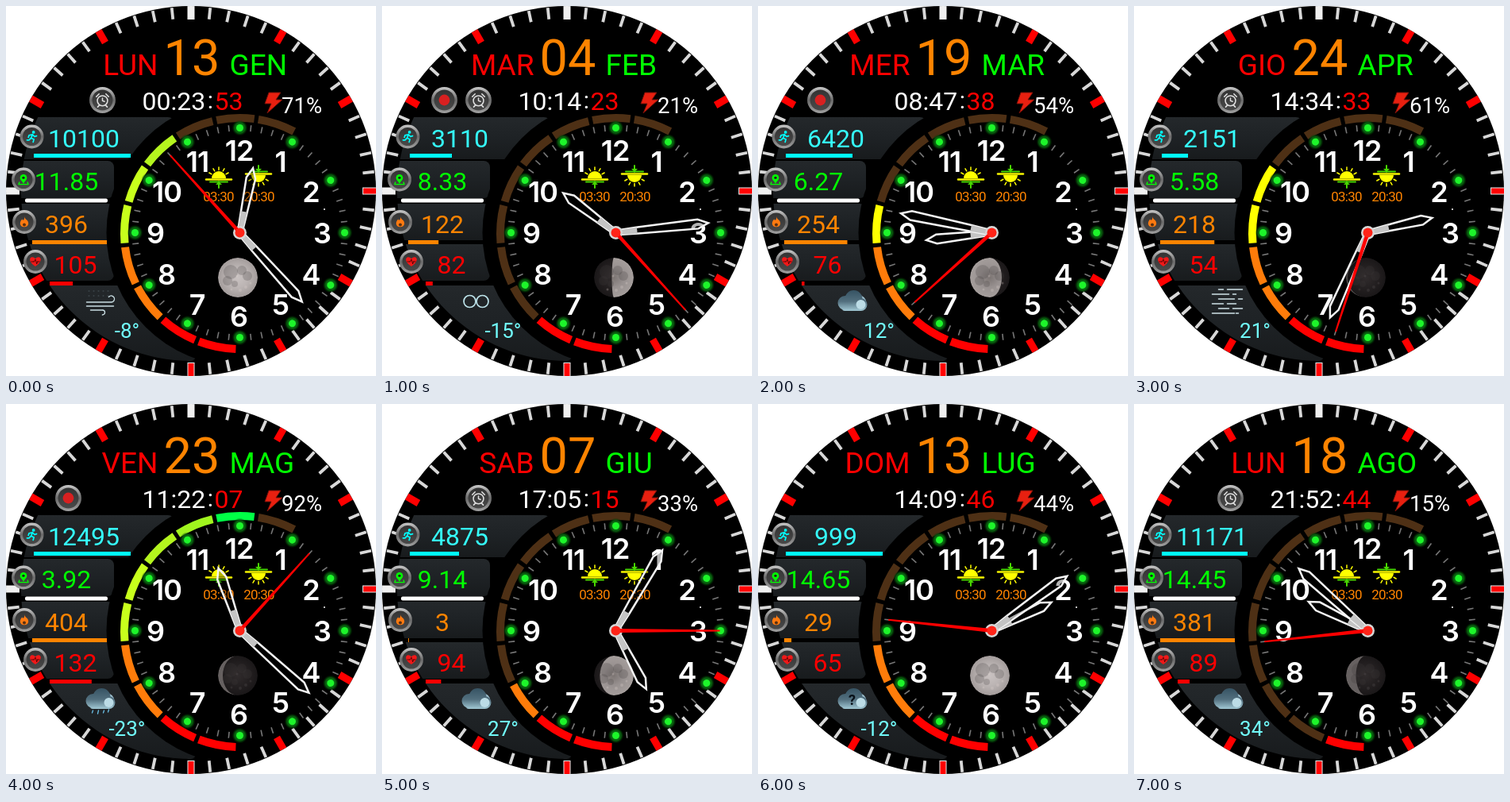
Recreate the animation shown at these times as an HTML page with a canvas. Size 466 px wide and 466 px high, loop 8000 ms.

```html
<!DOCTYPE html>
<html lang="it">
<head>
<meta charset="utf-8">
<title>Watch face</title>
<style>
html, body { margin: 0; width: 100%; height: 100%; overflow: hidden; background: #fff; }
canvas { display: block; width: 466px; height: 466px; }
</style>
</head>
<body>
<canvas id="stage" width="466" height="466"></canvas>
<script>
const ctx = document.getElementById('stage').getContext('2d');
const HOLD = 1000;
const CX = 294.5, CY = 285.5;
const RED = '#ff0000', ORANGE = '#ff8400', GREEN = '#00ff00', CYAN = '#00ffff';

// moon: lit share of the disc, negative when the right limb is lit
const state = (day, date, month, time, battery, steps, stepBar, km, kcal, pulse, weather, temp, moon, badges) =>
  ({ day, date, month, time, battery, steps, stepBar, km, kcal, pulse, weather, temp, moon, badges });

const states = [
  state('LUN', '13', 'GEN', '00:23:53', 71, 10100, 122, '11.85', 396, 105, 'wind', -8, 1, 'a'),
  state('MAR', '04', 'FEB', '10:14:23', 21, 3110, 53, '8.33', 122, 82, 'haze', -15, -.55, 'ab'),
  state('MER', '19', 'MAR', '08:47:38', 54, 6420, 84, '6.27', 254, 76, 'cloud', 12, .8, 'b'),
  state('GIO', '24', 'APR', '14:34:33', 61, 2151, 33, '5.58', 218, 54, 'mist', 21, .04, 'a'),
  state('VEN', '23', 'MAG', '11:22:07', 92, 12495, 122, '3.92', 404, 132, 'rain', -23, .12, 'b'),
  state('SAB', '07', 'GIU', '17:05:15', 33, 4875, 62, '9.14', 3, 94, 'cloud', 27, -.85, 'a'),
  state('DOM', '13', 'LUG', '14:09:46', 44, 999, 122, '14.65', 29, 65, 'unknown', -12, 1, ''),
  state('LUN', '18', 'AGO', '21:52:44', 15, 11171, 108, '14.45', 381, 89, 'cloud', 34, .25, 'a')
];

function text(str, x, y, size, color, align = 'left', weight = 400, spacing = 0, family = 'Roboto') {
  ctx.font = `${weight} ${size}px ${family}, sans-serif`;
  ctx.letterSpacing = spacing + 'px';
  ctx.textAlign = align;
  ctx.fillStyle = color;
  ctx.fillText(str, x, y);
}

function disc(x, y, r, fill) {
  ctx.beginPath();
  ctx.arc(x, y, r, 0, Math.PI * 2);
  ctx.fillStyle = fill;
  ctx.fill();
}

function poly(points, fill, stroke, width = 1) {
  ctx.beginPath();
  points.forEach(([x, y]) => ctx.lineTo(x, y));
  ctx.closePath();
  if (fill) { ctx.fillStyle = fill; ctx.fill(); }
  if (stroke) { ctx.strokeStyle = stroke; ctx.lineWidth = width; ctx.stroke(); }
}

function lines(segments, color, width) {
  ctx.strokeStyle = color;
  ctx.lineWidth = width;
  ctx.lineCap = 'round';
  ctx.beginPath();
  for (const [x1, y1, x2, y2] of segments) { ctx.moveTo(x1, y1); ctx.lineTo(x2, y2); }
  ctx.stroke();
  ctx.lineCap = 'butt';
}

function at(x, y, degrees, draw) {
  ctx.save();
  ctx.translate(x, y);
  ctx.rotate(degrees * Math.PI / 180);
  draw();
  ctx.restore();
}

function gradient(y0, y1, ...colors) {
  const g = ctx.createLinearGradient(0, y0, 0, y1);
  colors.forEach((c, i) => g.addColorStop(i / (colors.length - 1), c));
  return g;
}

function radial(r, ...colors) {
  const g = ctx.createRadialGradient(0, 0, 0, 0, 0, r);
  colors.forEach((c, i) => g.addColorStop(i / (colors.length - 1), c));
  return g;
}

function outerTicks() {
  for (let i = 0; i < 60; i++) at(233, 233, i * 6, () => {
    if (i % 5) {
      ctx.fillStyle = '#d8d8d8';
      ctx.fillRect(-1.9, -232, 3.8, 14.5);
      return;
    }
    const white = i === 0 || i === 45, bordered = i === 15 || i === 30;
    ctx.fillStyle = white || bordered ? '#f0f0f0' : RED;
    ctx.fillRect(-4.5, -233, 9, 17);
    if (bordered) {
      ctx.fillStyle = RED;
      ctx.fillRect(-3.5, -233, 7, 16);
    }
  });
}

function panel(x, y, w, h, r) {
  ctx.beginPath();
  ctx.roundRect(x, y, w, h, r);
  ctx.fillStyle = gradient(y, y + h, '#24282b', '#1e2225', '#181b1d');
  ctx.fill();
}

function panels() {
  ctx.save();
  ctx.beginPath();
  ctx.arc(233, 233, 214, 0, Math.PI * 2);
  ctx.clip();
  panel(0, 140, 212, 53, 8);
  panel(0, 195, 136, 47, 8);
  panel(0, 249, 136, 46, 8);
  panel(0, 300, 136, 46, 8);
  panel(0, 352, 240, 95, 8);
  disc(CX, CY, 168, '#000');
  ctx.restore();
}

function batteryArc(level) {
  const lit = Math.floor(level / 10);
  const mid = lit > 6 ? '#c8ff1c' : '#ffff00';
  const colors = [RED, RED, '#ff7c0a', '#ff7c0a', mid, mid, '#b4f51e', '#a0f51e', '#00ff46', '#00ff46'];
  ctx.lineWidth = 10;
  for (let i = 0; i < 10; i++) {
    const start = (92 + i * 20.8) * Math.PI / 180;
    ctx.strokeStyle = i < lit ? colors[i] : '#4e3015';
    ctx.beginPath();
    ctx.arc(CX, CY + 1, 145.5, start, start + 18.8 * Math.PI / 180);
    ctx.stroke();
  }
}

function dial() {
  for (let i = 0; i < 60; i++) at(CX, CY, i * 6, () => {
    if (i % 5) {
      ctx.fillStyle = '#777';
      ctx.fillRect(-.8, -136, 1.6, 8);
      return;
    }
    ctx.translate(0, -132);
    disc(0, 0, 10, radial(10, '#0b7a14', '#0b7a14', '#085a0e', 'rgba(0,50,0,0)'));
    disc(0, 0, 4.5, '#1df52a');
  });
  for (let n = 1; n <= 12; n++) {
    const a = n * Math.PI / 6;
    text(n, CX - 1 + Math.sin(a) * 105, CY + 13.5 - Math.cos(a) * 104.5, 36, '#fff', 'center', 600, n > 9 ? -1 : 0, 'Inter');
  }
  disc(401, 256, 1, '#fff');
}

function badge(x, y, r, icon) {
  ctx.save();
  ctx.translate(x, y);
  disc(0, 0, r, gradient(-r, r, '#c8c8c8', '#6a6a6a', '#a0a0a0'));
  disc(0, 0, r - 3.5, gradient(-r, r, '#303030', '#4c4c4c'));
  ctx.scale(.86, .86);
  icon();
  ctx.restore();
}

const icons = {
  run() {
    disc(2.5, -6.5, 2.2, CYAN);
    lines([[1, -3, -1, 2], [-1, 2, 3, 4], [3, 4, 2, 8], [-1, 2, -4, 5], [-4, 5, -7, 5],
      [1, -3, -4, -2], [-4, -2, -5, 1], [1, -3, 4, 0], [4, 0, 7, -1]], CYAN, 2);
  },
  pin() {
    disc(0, -2.5, 5, GREEN);
    poly([[-4.5, -1], [4.5, -1], [0, 6]], GREEN);
    disc(0, -2.5, 2, '#222');
    lines([[-6, 4, -7, 7], [-7, 7, 7, 7], [7, 7, 6, 4]], GREEN, 1.5);
  },
  flame() {
    ctx.beginPath();
    ctx.moveTo(0, -8);
    ctx.bezierCurveTo(1, -3, 6, -3, 6, 2);
    ctx.bezierCurveTo(6, 9, -6, 9, -6, 2);
    ctx.bezierCurveTo(-6, -1, -4, -3, -3, -4);
    ctx.bezierCurveTo(-2, -1, 1, -3, 0, -8);
    ctx.fillStyle = '#ff7a10';
    ctx.fill();
    disc(0, 4, 2.3, '#5a3010');
  },
  heart() {
    ctx.beginPath();
    ctx.moveTo(0, 7);
    ctx.bezierCurveTo(-15, -3, -5, -11, 0, -4);
    ctx.bezierCurveTo(5, -11, 15, -3, 0, 7);
    ctx.fillStyle = '#f01818';
    ctx.fill();
    lines([[-6, 0, -2, 0], [-2, 0, 0, -3], [0, -3, 2, 3], [2, 3, 3, 0], [3, 0, 6, 0]], '#400', 1);
  },
  alarm() {
    ctx.beginPath();
    ctx.arc(0, 1, 7.5, 0, Math.PI * 2);
    ctx.strokeStyle = '#e0e0e0';
    ctx.lineWidth = 1.8;
    ctx.stroke();
    lines([[0, -3, 0, 1], [0, 1, 3, 2], [-9, -5, -5, -9], [9, -5, 5, -9], [-5, 8, -7, 10], [5, 8, 7, 10]], '#e0e0e0', 1.8);
  },
  link() {
    disc(0, 0, 8, '#d82020');
  }
};

function bar(x, y, length, color) {
  ctx.fillStyle = color;
  ctx.fillRect(x, y, length, 5);
}

function stats(s) {
  bar(35, 186, s.stepBar, CYAN);
  bar(33, 295, Math.min(94, s.kcal * .313), ORANGE);
  bar(55, 347, Math.max(0, (s.pulse - 72) * .88), RED);
  ctx.beginPath();
  ctx.roundRect(24, 242.5, 104, 5, 2);
  ctx.fillStyle = '#fff';
  ctx.fill();
  badge(32.5, 164.5, 15, icons.run);
  badge(22, 218.5, 15, icons.pin);
  badge(23, 272, 15, icons.flame);
  badge(37, 322, 15, icons.heart);
  text(s.steps, 98, 177.5, 32, '#35ffff', 'center');
  text(s.km, 76, 232, 32, GREEN, 'center');
  text(s.kcal, 76, 286, 32, ORANGE, 'center');
  text(s.pulse, 87.5, 337, 32, RED, 'center');
}

function cloud(color) {
  ctx.fillStyle = color;
  ctx.beginPath();
  ctx.arc(-9, 1, 9, 0, 7);
  ctx.arc(2, -4, 11, 0, 7);
  ctx.arc(11, 3, 8, 0, 7);
  ctx.roundRect(-13, 2, 28, 9, 4);
  ctx.fill();
}

const weather = {
  wind() {
    for (let i = 0; i < 10; i++) disc(-14 + i % 5 * 6, -14 + Math.floor(i / 5) * 6, 1, '#394247');
    lines([[-17, 0, 14, 0], [-17, 5, 17, 5], [-12, 10, 3, 10]], '#c9dde2', 1.4);
    ctx.beginPath();
    ctx.arc(14, -4, 4, -2.6, 1.57);
    ctx.moveTo(3, 10);
    ctx.arc(3, 13, 3, -1.57, 1.8);
    ctx.stroke();
  },
  haze() {
    ctx.strokeStyle = '#bde3ea';
    ctx.lineWidth = 1.7;
    for (const x of [-8, 8]) {
      ctx.beginPath();
      ctx.arc(x, -1, 7.5, 0, Math.PI * 2);
      ctx.stroke();
    }
  },
  mist() {
    for (let i = 0; i < 6; i++) {
      const y = -16 + i * 6, left = i % 2 ? -20 : -12, split = i % 3 * 7 - 6;
      lines([[left, y, split, y], [split + 5, y, left + 30, y]], '#cfe2e8', 1.5);
    }
  },
  cloud() {
    disc(8, 1, 10, '#9fc2d0');
    cloud(gradient(-14, 12, '#385565', '#526f7e', '#a8d0dc'));
    disc(11, 3, 6, '#bcdce6');
  },
  rain() {
    weather.cloud();
    lines([[-9, 13, -10, 16], [-2, 13, -3, 17], [5, 13, 4, 16], [11, 12, 10, 15]], '#69bfe5', 1.3);
  },
  unknown() {
    weather.cloud();
    text('?', 0, 6, 18, '#081018', 'center', 700);
  }
};

function sun(x, y, flip) {
  ctx.save();
  ctx.translate(x, y);
  ctx.scale(1, flip);
  ctx.beginPath();
  ctx.arc(0, 0, 9, Math.PI, 0);
  ctx.fillStyle = '#ffff00';
  ctx.fill();
  const rays = [];
  for (let i = 1; i < 6; i++) {
    const a = Math.PI * (1 + i / 6), c = Math.cos(a), s = Math.sin(a);
    rays.push([c * 10.5, s * 10.5, c * 14, s * 14]);
  }
  lines(rays, '#ffff00', 1.5);
  lines([[-16, 1.5, 16, 1.5]], '#f4f400', 2.5);
  lines([[0, 4, 0, 12], [-11, 4.5, 11, 4.5]], '#48d800', 2);
  poly([[-4, 8], [0, 4], [4, 8]], '#48d800');
  ctx.restore();
}

function moon(phase) {
  const share = Math.abs(phase);
  ctx.save();
  ctx.translate(292, 342);
  ctx.beginPath();
  ctx.arc(0, 0, 25, 0, Math.PI * 2);
  ctx.clip();
  disc(0, 0, 25, radial(25, '#302b2c', '#252122', '#1a1718'));
  ctx.save();
  ctx.scale(Math.sign(phase), 1);
  // Lit limb bounded by an elliptical terminator.
  const edge = 25 * (2 * share - 1);
  ctx.beginPath();
  ctx.arc(0, 0, 25, Math.PI / 2, Math.PI * 1.5);
  ctx.ellipse(0, 0, Math.abs(edge), 25, 0, -Math.PI / 2, Math.PI / 2, edge < 0);
  ctx.fillStyle = share === 1 ? radial(25, '#c9c2c1', '#bcb5b4', '#a39c9b') : radial(25, '#7c7573', '#989190', '#a59e9c');
  ctx.globalAlpha = share < .3 ? .55 : 1;
  ctx.fill();
  ctx.restore();
  for (const [x, y, r] of [[-9, -7, 9], [5, -9, 6], [12, -2, 6], [-13, 4, 6], [-4, 8, 4]])
    disc(x, y, r, 'rgba(65,58,60,.24)');
  const craters = share < .3 ? 'rgba(225,215,210,.08)' : 'rgba(225,215,210,.25)';
  for (const [x, y, r] of [[3, 16, 2], [10, 12, 2], [-8, 15, 1.5], [16, 7, 1.5], [-1, -2, 1.5]])
    disc(x, y, r, craters);
  ctx.restore();
}

function hand(angle, length) {
  at(CX, CY, angle, () => {
    const shoulder = 13 - length;
    poly([[-3, -5], [-4, -28], [-5.8, shoulder], [0, -length], [5.8, shoulder], [4, -28], [3, -5]],
      'rgba(0,0,0,.3)', '#f4f4f4', 2.5);
    poly([[-3, -6], [-4, -27], [4, -27], [3, -6]], '#c4c4c4');
  });
}

function hands(h, m, s) {
  hand(h % 12 * 30 + m / 2, 83);
  hand(m * 6, 117);
  disc(CX, CY, 8.5, '#d6d6d6');
  at(CX, CY, s * 6, () => poly([[-2.4, 0], [-1, -131], [1, -131], [2.4, 0]], RED));
  disc(CX, CY, 6, '#ff2418');
}

function header(s) {
  text(s.day, 191.5, 87, 37, RED, 'right');
  text(s.date, 234, 86.5, 63, ORANGE, 'center');
  text(s.month, 281.5, 87, 37, GREEN);
  text(s.time.slice(0, 5), 171.5, 130.5, 32, '#fff');
  text(':', 257.5, 128.5, 30, '#fff', 'center');
  text(s.time.slice(6), 262.5, 130.5, 32, RED);
  poly([[331, 109], [346, 109], [340, 118], [348, 118], [329, 135], [334, 123], [326, 123]], '#e82010', '#751008', 1);
  text(s.battery + '%', 347, 135, 27.5, '#fff');
  if (s.badges.includes('b')) badge(78.5, 118.5, 16.5, icons.link);
  if (s.badges.includes('a')) badge(121.5, 118.5, 16.5, icons.alarm);
}

function draw(s) {
  ctx.fillStyle = '#fff';
  ctx.fillRect(0, 0, 466, 466);
  ctx.save();
  ctx.beginPath();
  ctx.arc(233, 233, 233, 0, Math.PI * 2);
  ctx.clip();
  ctx.fillStyle = '#000';
  ctx.fillRect(0, 0, 466, 466);
  outerTicks();
  panels();
  batteryArc(s.battery);
  dial();
  header(s);
  stats(s);
  at(118.5, 373, 0, weather[s.weather]);
  text(s.temp + '°', 152.5, 418, 26, '#72ffff', 'center');
  sun(268, 217, 1);
  sun(318, 213, -1);
  text('03:30', 267.5, 246, 17, ORANGE, 'center', 400, -.8);
  text('20:30', 318.5, 246, 17, ORANGE, 'center', 400, -.8);
  moon(s.moon);
  hands(...s.time.split(':').map(Number));
  ctx.restore();
}

const begin = performance.now();
function tick() {
  const elapsed = performance.now() - begin;
  draw(states[Math.floor(elapsed / HOLD) % states.length]);
  requestAnimationFrame(tick);
}
tick();
</script>
</body>
</html>
```
